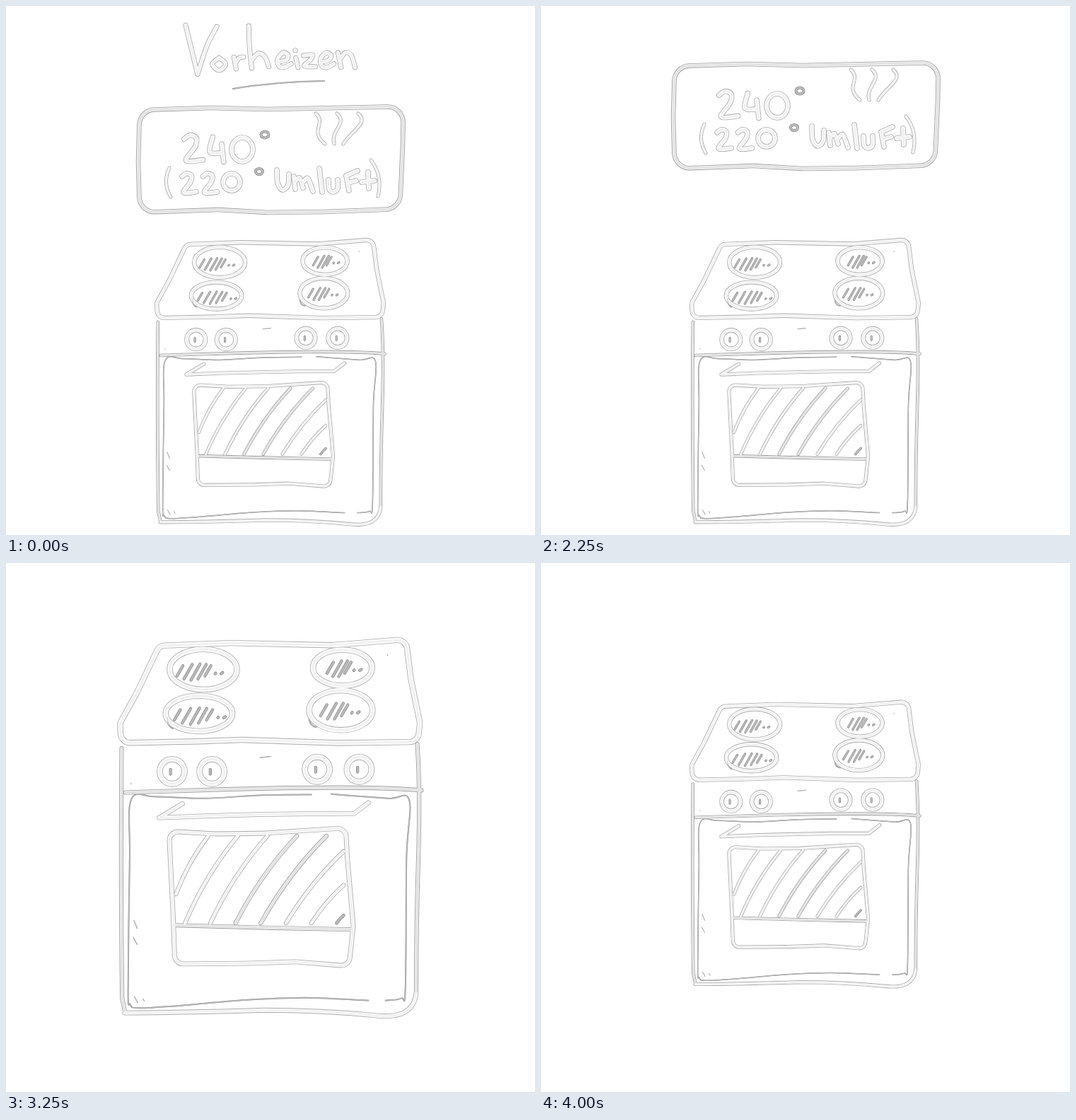
These frames come from a looping animation (748x748 px, 4.25 s). An HTML page with a canvas:

```html
<!DOCTYPE html>
<html lang="de">
<head>
<meta charset="utf-8">
<title>Vorheizen</title>
<style>
  html, body { margin: 0; width: 100%; height: 100%; overflow: hidden; background: #fff; }
  canvas { display: block; width: 100vw; height: 100vh; }
</style>
</head>
<body>
<canvas id="stage" width="748" height="748" role="img" aria-label="Vorheizen: 240° (220° Umluft)"></canvas>
<script>
const ctx = document.getElementById('stage').getContext('2d');
ctx.lineCap = ctx.lineJoin = 'round';

// Shades of a stroke from its edge to its centre line.
const LIGHT = ['#a8a8a8', '#fefefe', '#f7f7f7', '#f0f0f0'];
const MID = ['#9c9c9c', '#f4f4f4', '#eaeaea', '#e0e0e0'];
const DARK = ['#868686', '#c4c4c4', '#bebebe', '#b8b8b8'];

const parse = line => line.trim().split(/\s+/).map(pair => pair.split(',').map(Number));

// Smooth curves through "x,y" points; "|" lifts the pen.
function flow(text, x = 0, y = 0, size = 1) {
  return text.split('|').map(line => {
    const p = parse(line).map(([px, py]) => [x + px * size, y + py * size]);
    let d = `M${p[0]}`;
    for (let i = 0; i < p.length - 1; i++) {
      const [a, b, c, e] = [p[i - 1] || p[i], p[i], p[i + 1], p[i + 2] || p[i + 1]];
      const h1 = b.map((v, k) => v + (c[k] - a[k]) / 6);
      const h2 = c.map((v, k) => v - (e[k] - b[k]) / 6);
      d += `C${h1} ${h2} ${c}`;
    }
    return d;
  }).join('');
}

// Closed outline with rounded corners.
function frame(text, radius) {
  const p = parse(text), path = new Path2D();
  const [first, last] = [p[0], p[p.length - 1]];
  path.moveTo((first[0] + last[0]) / 2, (first[1] + last[1]) / 2);
  p.forEach((point, i) => path.arcTo(...point, ...p[(i + 1) % p.length], radius));
  path.closePath();
  return path;
}

const oval = (x, y, rx, ry = rx) =>
  `M${x - rx} ${y}a${rx} ${ry} 0 1 0 ${2 * rx} 0a${rx} ${ry} 0 1 0 ${-2 * rx} 0z`;

const pen = (width, tone, ...shapes) => {
  const path = new Path2D();
  for (const s of shapes.flat()) path.addPath(s instanceof Path2D ? s : new Path2D(s));
  return { width, tone, path };
};

// Handwriting: advance and strokes, in units of the x-height.
const glyphs = {
  V: [1.8, '0,-2.95 .35,-1.5 .8,.35 | 2.1,-2.85 1.45,-1.6 .8,.35'],
  o: [1.45, '.45,-.75 0,-.33 .45,.1 .9,-.33 .45,-.75'],
  r: [1, '0,-.8 .15,0 | .1,-.35 .35,-.75 .65,-.8'],
  h: [1.9, '0,-2.9 .05,-1.5 .2,-.05 | .2,-.6 .65,-1.05 1.1,-.8 1.35,-.15'],
  e: [1.22, '.05,-.45 .6,-.6 .75,-.9 .45,-1.1 .05,-.7 .1,-.25 .45,-.1 .95,-.35'],
  i: [.57, '.05,-.75 .2,-.1 | 0,-1.25 .02,-1.25'],
  z: [1.1, '0,-.9 .6,-.95 .45,-.6 .05,-.2 .8,-.15'],
  n: [1.4, '0,-1.1 .2,-.1 | .1,-.6 .5,-1.1 .9,-.9 1.15,-.1'],
  2: [1.4, '.1,-1.1 .4,-1.3 .72,-1.15 .65,-.7 .2,-.02 1.05,-.05'],
  4: [1.4, '.15,-1.2 0,-.45 .6,-.4 | .6,-.85 .7,.05'],
  U: [1.2, '0,-1.5 .05,-.6 .4,-.1 .8,-.45 .85,-1.2'],
  m: [1.8, '0,-1.05 .1,-.15 | .1,-.7 .4,-.95 .65,-.25 | .7,-.7 1,-.9 1.35,0'],
  l: [.65, '0,-1.6 .2,.05'],
  u: [1.25, '0,-.8 .05,-.15 .35,.05 .65,-.2 .65,-.8'],
  F: [1.1, '0,-1.1 .2,-.05 | 0,-1.1 .8,-1.45 | .15,-.6 .7,-.75'],
  t: [1, '.45,-1.35 .5,-.2 | 0,-.65 .9,-.75']
};

const write = (text, x, y, size) => [...text].map(char => {
  const [advance, strokes] = glyphs[char];
  const d = flow(strokes, x, y, size);
  x += advance * size;
  return d;
});

const title = [
  pen(7, LIGHT, write('Vorheizen', 254, 89, 21)),
  pen(2.2, DARK, 'M321 117Q380 107 450 106')
];

const steam = [0, 1, 2].map(i => `M${438 + 30 * i} 152c16 14,-10 24,${13 - 17 * i} 43`);

const panel = [
  pen(6.5, MID, frame('189,147 290,144 370,146 562,142 561,195 557,287 450,291 370,292 300,288 189,292 187,220', 22)),
  pen(7.5, LIGHT,
    write('24', 249, 219, 28), oval(334, 203, 15, 17),
    write('22', 247, 264, 21), oval(319, 249, 12),
    write('Umluft'.replace('f', 'F'), 383, 262, 20)),
  pen(5, LIGHT, 'M231 229Q221 250 233 270M516 218Q533 240 526 269', steam),
  pen(4, DARK, oval(366, 182, 5.5, 4.5), oval(358, 234, 5, 4))
];

// Slanted lines across the oven window, cut off at its sides.
function windowLine(i) {
  const top = 258 + 55 * i, bottom = 168 + 47 * i, run = top - bottom;
  const at = t => [top - run * t, 388 + 162 * t];
  const [ax, ay] = at(Math.max(0, (top - 510) / run));
  const [bx, by] = at(Math.min(1, (top - 198) / run));
  const bow = (by - ay) / 16;
  return `M${ax} ${ay}Q${(ax + bx) / 2 - bow} ${(ay + by) / 2 - bow} ${bx} ${by}`;
}

// Hatching on a hot plate: strokes longest in the middle, then two dots.
function hatch(x, y, count, gap) {
  let d = '';
  for (let i = 0; i < count; i++) {
    const swell = Math.sin(Math.PI * (i + .6) / (count + .2));
    d += `M${x + gap * i} ${y + 4 + 12 * swell}l${8 + 9 * swell} ${-13 - 17 * swell}`;
  }
  const dots = x + gap * count + 6;
  return d + `M${dots} ${y + 4}l1 -1M${dots + 11} ${y + 4}l3 -2`;
}

const knobs = [[191, 268], [265, 268], [461, 264], [539, 264]];

const stove = [
  // cooktop
  pen(11, LIGHT,
    frame('94,178 96,215 240,212 320,209 500,215 648,213 652,178 635,95 626,22 490,33 300,29 167,34 125,122', 18),
    oval(249, 78, 62.5, 37.5), oval(508, 75, 55, 33.5), oval(505, 154, 59, 37), oval(241, 160, 62, 33)),
  pen(11.5, LIGHT, knobs.map(([x, y]) => oval(x, y, 23))),
  // body
  pen(8, MID,
    'M97 225Q95 480 98 690L103 714M647 217Q653 300 649 430T645 680',
    'M104 307Q200 304 300 301T500 298T655 303'),
  pen(9, LIGHT, 'M103 717Q200 717 360 712Q470 712 570 722Q640 730 645 680'),
  // handle
  pen(9, LIGHT, 'M210 328L167 354Q350 346 530 346L556 326'),
  // window
  pen(8, LIGHT, [0, 1, 2, 5, 6].map(windowLine)),
  pen(8, MID, [3, 4].map(windowLine), 'M196 554Q360 559 527 562'),
  pen(9, LIGHT, frame('185,379 270,384 360,383 514,373 517,430 528,555 520,630 420,622 330,625 196,626 193,540', 16)),
  pen(6, DARK, windowLine(7)),
  // door seam
  pen(2.6, DARK, flow('450,311 360,312 250,318 160,315 115,320 112,430 109,675 113,701 127,708 200,704 330,693 440,689 556,694 | 487,310 592,318 632,321 627,430 625,670 617,690 588,694')),
  // hot plates and knobs
  pen(5.5, DARK,
    hatch(200, 82, 5, 13), hatch(195, 164, 5, 15), hatch(479, 76, 4, 11), hatch(467, 155, 4, 13),
    knobs.map(([x, y]) => `M${x - 3} ${y - 4}v9`)),
  pen(3, DARK, 'M182 168Q182 183 192 188M446 170Q448 184 459 185'),
  // loose pencil marks
  pen(1.5, DARK, 'M355 242l20 -2M592 51v1M120 545l6 15M119 577l7 13M121 687l6 11M137 691l2 4M114 290l1 1')
];

// Edges first, then inner shades, so crossing strokes merge into one outline.
function sketch(strokes, scale = 1) {
  const shadeWidths = [
    w => w,
    w => Math.max(w - 1.7 / scale, w * .25),
    w => w * .5,
    w => w * .25
  ];
  shadeWidths.forEach((widthOf, shade) => {
    for (const { width, tone, path } of strokes) {
      ctx.strokeStyle = tone[shade];
      ctx.lineWidth = widthOf(width);
      ctx.stroke(path);
    }
  });
}

const CENTER = 374, PANEL_Y = 218, LIFT = -62, TILT = 13 * Math.PI / 180;
const LOOP = 4250, INTRO = 1500, STEP = 250, PANEL_STEPS = 6;
const ZOOM = [[.575, 398], [.76, 375], [1, 373.5]]; // scale, centre height
const HOME = [.575, 532.3];

function drawPanel(step) {
  // upright on odd steps, leaning right, then left, in between
  const tilt = step > 0 ? [0, TILT, 0, -TILT][(step - 1) % 4] : 0;
  ctx.save();
  ctx.translate(CENTER, PANEL_Y + (step > 0 ? LIFT : 0));
  ctx.rotate(tilt);
  ctx.translate(-CENTER, -PANEL_Y);
  sketch(panel);
  ctx.restore();
}

function drawStove([scale, y]) {
  ctx.save();
  ctx.translate(CENTER, y);
  ctx.scale(scale, scale);
  ctx.translate(-CENTER, -373.5);
  sketch(stove, scale);
  ctx.restore();
}

function draw(time) {
  const t = time % LOOP;
  const step = Math.floor((t - INTRO) / STEP);
  ctx.fillStyle = '#fff';
  ctx.fillRect(0, 0, 748, 748);
  if (t < INTRO) sketch(title);
  if (step < PANEL_STEPS) {
    drawPanel(step);
    drawStove(HOME);
  } else {
    drawStove(ZOOM[2 - Math.abs(step - PANEL_STEPS - 2)]);
  }
}

const start = performance.now();
function tick() {
  draw(performance.now() - start);
  requestAnimationFrame(tick);
}
tick();
</script>
</body>
</html>
```
